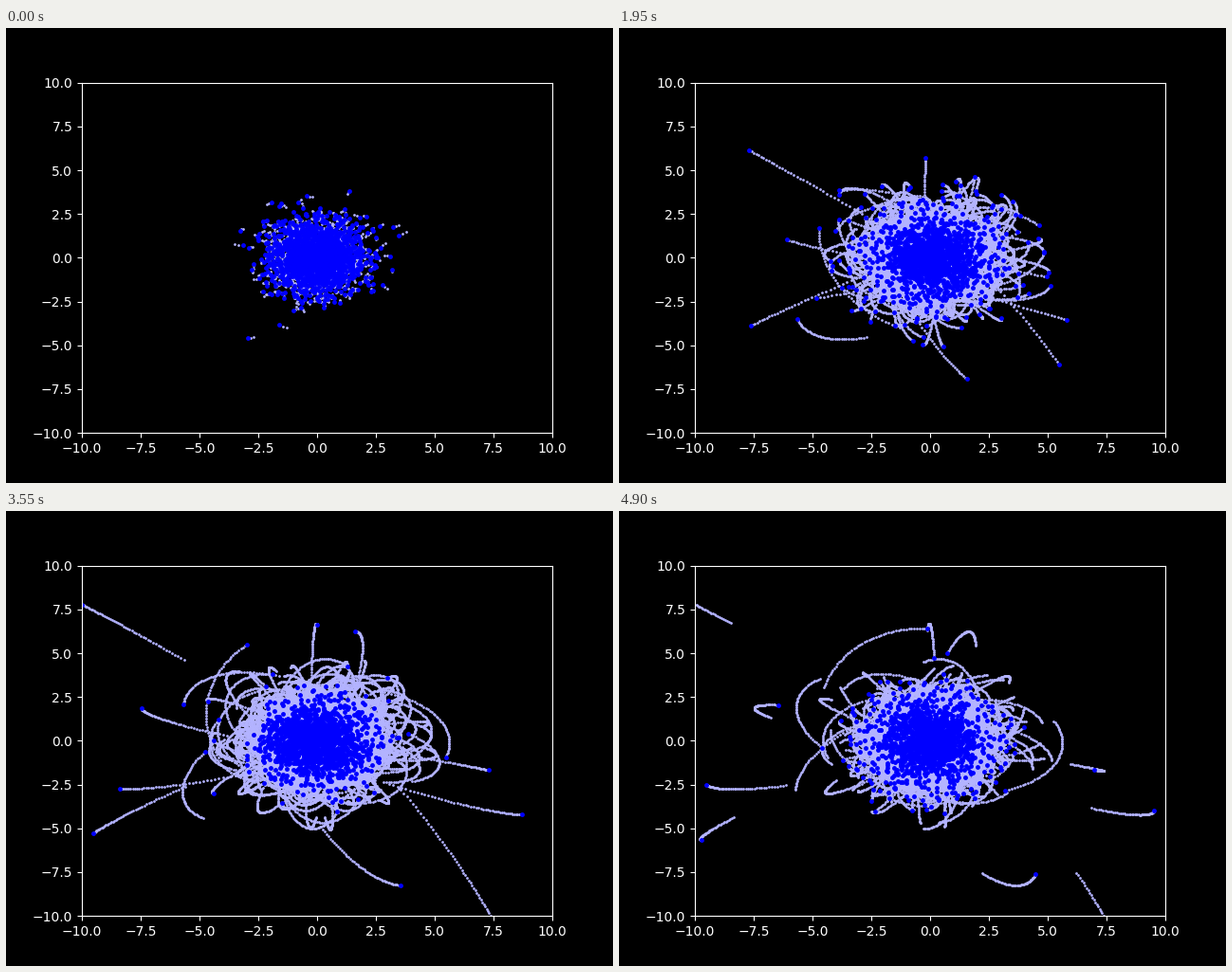
These frames come from a looping animation (640 px wide and 480 px high, 4950 ms). A matplotlib script:

```python
import numpy as np
import matplotlib.pyplot as plt
from matplotlib.animation import FuncAnimation

FRAMES, INTERVAL = 99, 50
LEAD = 2                      # steps already taken when the loop starts
TRAIL = 50
STEPS = FRAMES + LEAD
BODIES, SPEED = 1600, 0.08    # count and velocity spread per step
PULL, CORE = 0.021, 1.2       # strength of the 1/r field, width of the cloud
HALO = 5.5                    # random bodies stay inside this radius

# Bodies thrown far out: x, y, vx, vy at the step KEY_STEP.
KEY_STEP = 54 + LEAD
FAR = np.array([
    (-8.95, 7.05, -0.073, 0.052),
    (-8.75, -4.65, -0.060, -0.044),
    (-7.10, 1.50, -0.045, 0.027),
    (-6.85, -2.65, -0.112, -0.014),
    (-5.65, -2.30, 0.022, 0.090),
    (-5.10, 3.25, -0.060, -0.055),
    (-4.25, 3.80, 0.055, 0.122),
    (-0.10, 6.55, 0.006, 0.030),
    (1.90, 5.80, -0.008, 0.053),
    (2.60, -7.85, 0.063, -0.043),
    (5.50, 0.60, 0.030, -0.090),
    (6.45, -1.45, 0.074, -0.019),
    (6.65, -8.40, 0.067, -0.140),
    (7.45, -4.00, 0.091, -0.022),
])


def gravity(pos):
    """Planar gravity of a Gaussian cloud around the centre."""
    r2 = (pos ** 2).sum(axis=1, keepdims=True) + 1e-9
    return PULL * np.expm1(-r2 / (2 * CORE ** 2)) * pos / r2


def orbit(pos, vel, steps):
    """Leapfrog paths as (step, body, xy), the start included."""
    path = [pos]
    for _ in range(steps):
        half = vel + gravity(pos) / 2
        pos = pos + half
        vel = half + gravity(pos) / 2
        path.append(pos)
    return np.array(path)


def random_cloud():
    rng = np.random.default_rng(17)
    pos = rng.normal(size=(BODIES, 2))
    vel = rng.normal(scale=SPEED, size=(BODIES, 2))
    path = orbit(pos, vel, STEPS - 1)
    reach = np.hypot(path[..., 0], path[..., 1]).max(axis=0)
    return path[:, reach < HALO]


def far_bodies():
    pos, vel = FAR[:, :2], FAR[:, 2:]
    before = orbit(pos, -vel, KEY_STEP)[:0:-1]
    after = orbit(pos, vel, STEPS - 1 - KEY_STEP)
    return np.concatenate([before, after])


bodies = np.concatenate([random_cloud(), far_bodies()], axis=1)

plt.style.use("dark_background")
fig, ax = plt.subplots(figsize=(6.4, 4.8), dpi=100)
ax.set(xlim=(-10, 10), ylim=(-10, 10))
trails, = ax.plot([], [], "o", ms=1, color=(0.7, 0.7, 1))
heads, = ax.plot([], [], "o", ms=2.5, color="blue")


def draw(i):
    now = i + LEAD
    past = bodies[max(now - TRAIL, 0):now + 1].reshape(-1, 2)
    trails.set_data(past[:, 0], past[:, 1])
    heads.set_data(bodies[now, :, 0], bodies[now, :, 1])
    return trails, heads


anim = FuncAnimation(fig, draw, frames=FRAMES, interval=INTERVAL,
                     repeat=True, repeat_delay=0)
plt.show()
```
